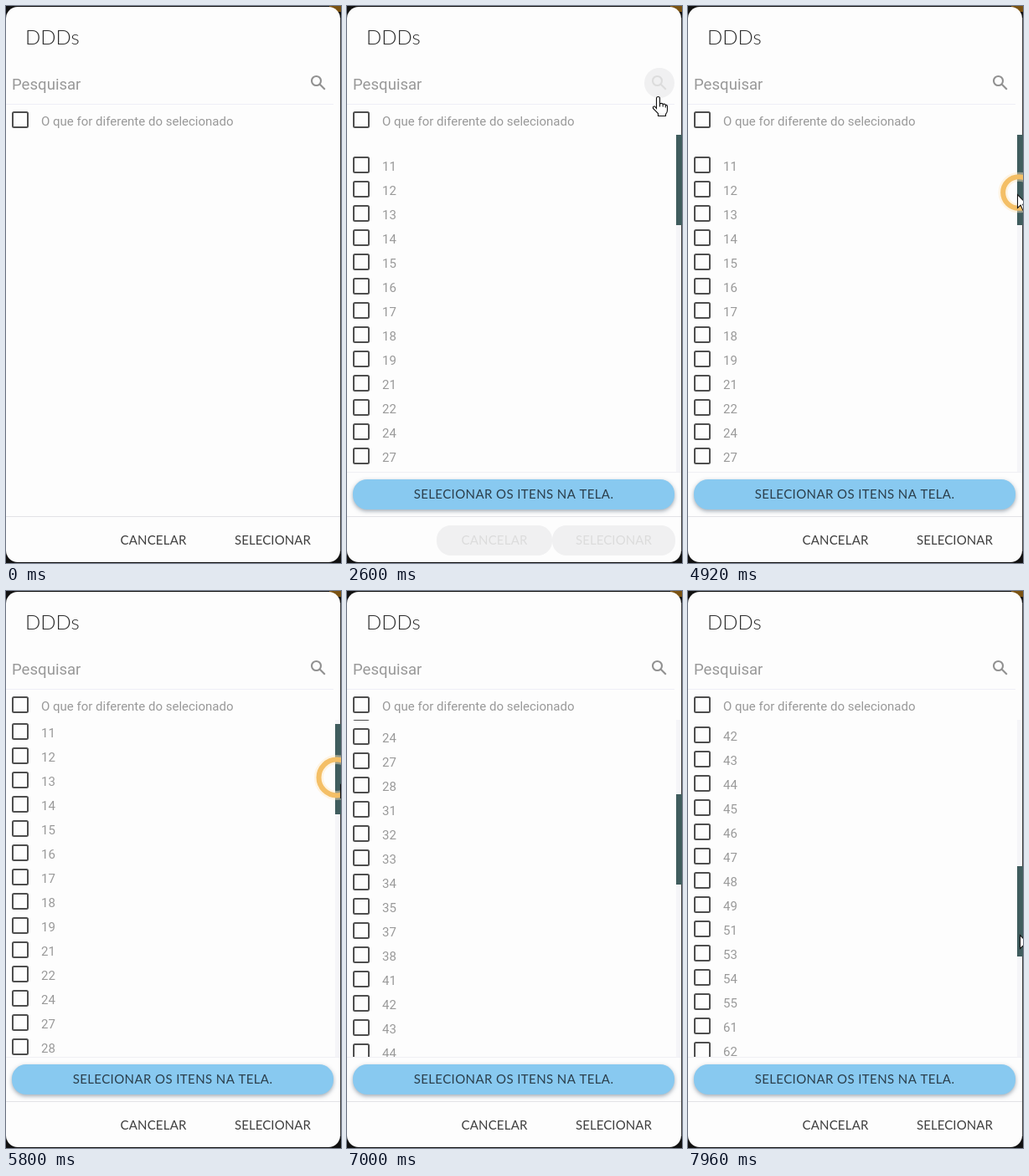
Recreate the animation shown at these times as an HTML page with a canvas. Size 400x666 px, loop 8 s.

```html
<!DOCTYPE html>
<html lang="pt-BR">
<head>
<meta charset="utf-8">
<title>DDDs</title>
<style>
  html, body { margin: 0; width: 100%; height: 100%; overflow: hidden; background: #111; }
  canvas { display: block; width: 400px; height: 666px; }
</style>
</head>
<body>
<canvas id="stage"></canvas>
<script>
const W = 400, H = 666, LOOP = 8000;
const canvas = document.getElementById('stage');
const ctx = canvas.getContext('2d');
const dpr = window.devicePixelRatio || 1;
canvas.width = W * dpr;
canvas.height = H * dpr;

const PAPER = '#fdfdfd', INK = '#2c2c2c', MUTED = '#999', BOX = '#4e4e4e';
const BODY = 'Roboto, sans-serif', HEAD = 'Lato, sans-serif';
const LIST = { top: 154, height: 403, first: 190, step: 29, ratio: 3.74 };
const SHOW_LIST = 2280, DRAG = 5440, DRAG_END = 7960;

// Area codes in use
const unused = new Set([23, 25, 26, 29, 36, 39, 52, 56, 57, 58, 59]);
const codes = [];
for (let n = 11; n < 70; n++) if (n % 10 && !unused.has(n)) codes.push(n);

// Pointer moves before the drag
const MOVES = [
  { from: 240, to: 600, x: 345, y: 63 },
  { from: 600, to: 840, x: 369, y: 93 },
  { from: 1720, to: 2480, x: 371, y: 107 },
  { from: 2600, to: 3320, x: 246, y: 331 },
  { from: 3360, to: 3920, x: 390, y: 240 },
  { from: 4240, to: 4320, x: 388, y: 231 },
  { from: 4480, to: 4600, x: 393, y: 225 }
];

const ramp = (t, from, to) => Math.min(1, Math.max(0, (t - from) / (to - from)));
const easeOut = p => 1 - (1 - p) * (1 - p);

// Slow start, then two nearly even pulls
function scrollAt(t) {
  return Math.round(22 * ramp(t, DRAG, 5800) + 313 * ramp(t, 5800, 7000) + 321 * ramp(t, 7000, DRAG_END));
}

function pointerAt(t, scroll) {
  if (t >= DRAG) {
    const p = ramp(t, DRAG, DRAG_END);
    return [394 + 2 * p + 10 * Math.sin(Math.PI * p), 225 + 1.06 * scroll / LIST.ratio];
  }
  let x = 308, y = 186;
  for (const m of MOVES) {
    const p = easeOut(ramp(t, m.from, m.to));
    x += (m.x - x) * p;
    y += (m.y - y) * p;
  }
  return [x, y];
}

function text(str, x, y, font, color, align = 'left', spacing = 0) {
  ctx.font = font;
  ctx.fillStyle = color;
  ctx.textAlign = align;
  if ('letterSpacing' in ctx) ctx.letterSpacing = spacing + 'px';
  ctx.fillText(str, x, y);
}

function rect(x, y, w, h, color) {
  ctx.fillStyle = color;
  ctx.fillRect(x, y, w, h);
}

function pill(x, y, w, h, r, color) {
  ctx.fillStyle = color;
  ctx.beginPath();
  ctx.roundRect(x, y, w, h, r);
  ctx.fill();
}

function checkbox(cy) {
  ctx.strokeStyle = BOX;
  ctx.lineWidth = 2;
  ctx.beginPath();
  ctx.roundRect(8, cy - 9, 18, 18, 1.5);
  ctx.stroke();
}

function grey(from, to, p) {
  const v = Math.round(from + (to - from) * p);
  return `rgb(${v},${v},${v})`;
}

function panel() {
  rect(0, 0, W, H, '#111');
  rect(386, 0, 14, 7, '#7a5212');
  rect(399, 14, 1, 638, '#444');
  pill(0, 1, 399, 664, 14, PAPER);
}

function header(dim) {
  text('DDDs', 23, 46, '300 24px ' + HEAD, INK);
  text('Pesquisar', 7, 100, '18.6px ' + BODY, MUTED);
  rect(0, 117, 391, 1, '#eeeef6');

  ctx.globalAlpha = dim;
  pill(355, 74, 36, 36, 18, '#f0f0f1');
  ctx.globalAlpha = 1;
  ctx.strokeStyle = grey(145, 220, dim);
  ctx.lineWidth = 2.1;
  ctx.beginPath();
  ctx.arc(370.5, 89.5, 5.5, 0, Math.PI * 2);
  ctx.moveTo(374.6, 93.6);
  ctx.lineTo(380.8, 99.8);
  ctx.stroke();

  checkbox(136);
  text('O que for diferente do selecionado', 42, 143, '15px ' + BODY, MUTED);
}

function list(scroll) {
  ctx.save();
  ctx.beginPath();
  ctx.rect(0, LIST.top, W, LIST.height);
  ctx.clip();
  codes.forEach((code, i) => {
    const y = LIST.first + i * LIST.step - scroll;
    checkbox(y);
    text(code, 42, y + 7, '15px ' + BODY, MUTED);
  });
  rect(393, LIST.top, 6, LIST.height, '#f5f5f8');
  rect(393, LIST.top + Math.floor(scroll / LIST.ratio), 7, 108, '#405d5e');
  ctx.restore();

  rect(0, 557, 399, 1, '#f0f0f4');
  ctx.save();
  ctx.shadowColor = 'rgba(70,90,110,.5)';
  ctx.shadowBlur = 5 * dpr;
  ctx.shadowOffsetY = 2 * dpr;
  pill(7, 566, 384, 36, 17, '#88c9f0');
  ctx.restore();
  text('SELECIONAR OS ITENS NA TELA.', 199, 589, '15px ' + HEAD, '#2b3f4c', 'center', 0.4);
}

function footer(dim) {
  rect(0, 610, 399, 1, '#e2e2e6');
  ctx.globalAlpha = dim;
  pill(107, 621, 138, 36, 17, '#f0f0f1');
  pill(245, 621, 147, 36, 17, '#f0f0f1');
  ctx.globalAlpha = 1;
  const color = grey(64, 220, dim);
  text('CANCELAR', 176, 644, '15px ' + HEAD, color, 'center', 0.2);
  text('SELECIONAR', 318.5, 644, '15px ' + HEAD, color, 'center', 0.1);
}

function tooltip() {
  rect(378, 108, 40, 25, '#5c5c5c');
  rect(379, 109, 40, 23, '#fff');
  text('DDDs', 386, 125, '12px "Open Sans", sans-serif', '#666');
}

function ring(x, y, r, alpha) {
  ctx.globalAlpha = alpha;
  ctx.beginPath();
  ctx.arc(x, y, r, 0, Math.PI * 2);
  ctx.lineWidth = 11;
  ctx.strokeStyle = 'rgba(255,232,195,.45)';
  ctx.stroke();
  ctx.lineWidth = 6;
  ctx.strokeStyle = '#f4bf66';
  ctx.stroke();
  ctx.globalAlpha = 1;
}

function click(t, start, hold, x, y) {
  if (t < start) return;
  const end = start + hold;
  ring(x, y, 8 + 13.5 * ramp(t, start - 40, start + 160), 1 - ramp(t, end, end + 160));
}

const ARROW = new Path2D('M0 0V16L3.7 12.6L6.3 18.6L8.8 17.5L6.2 11.7H11.4Z');
const HAND = new Path2D('M-2 14V2Q-2 0 0 0Q2 0 2 2V8.5Q4 7 6 9Q8 8 9 10Q11 9.5 11 12V16Q11 19 9 21V23H0V20L-6 14Q-6.5 11 -4 11.5Z');
const KNUCKLES = new Path2D('M2 8V12M5.7 9V12M8.8 10.5V13');

function pointer(x, y, hand) {
  ctx.save();
  ctx.translate(Math.round(x) + 0.5, Math.round(y) + 0.5);
  ctx.fillStyle = '#fff';
  ctx.strokeStyle = '#111';
  ctx.lineWidth = 1.1;
  const shape = hand ? HAND : ARROW;
  ctx.fill(shape);
  ctx.stroke(shape);
  if (hand) ctx.stroke(KNUCKLES);
  ctx.restore();
}

function draw(t) {
  ctx.setTransform(dpr, 0, 0, dpr, 0, 0);
  const dim = ramp(t, 1760, 1920) - ramp(t, 2680, 2840);
  const scroll = scrollAt(t);
  const [x, y] = pointerAt(t, scroll);

  panel();
  header(dim);
  if (t >= SHOW_LIST) list(scroll);
  footer(dim);
  if (t >= 1440 && t < 1720) tooltip();
  click(t, 1680, 160, 369, 93);
  click(t, 4800, 1040, 395, 223);
  if (t >= 240) pointer(x, y, t >= 760 && t < 2680);
}

const start = performance.now();
function tick() {
  draw((performance.now() - start) % LOOP);
  requestAnimationFrame(tick);
}
tick();
</script>
</body>
</html>
```
